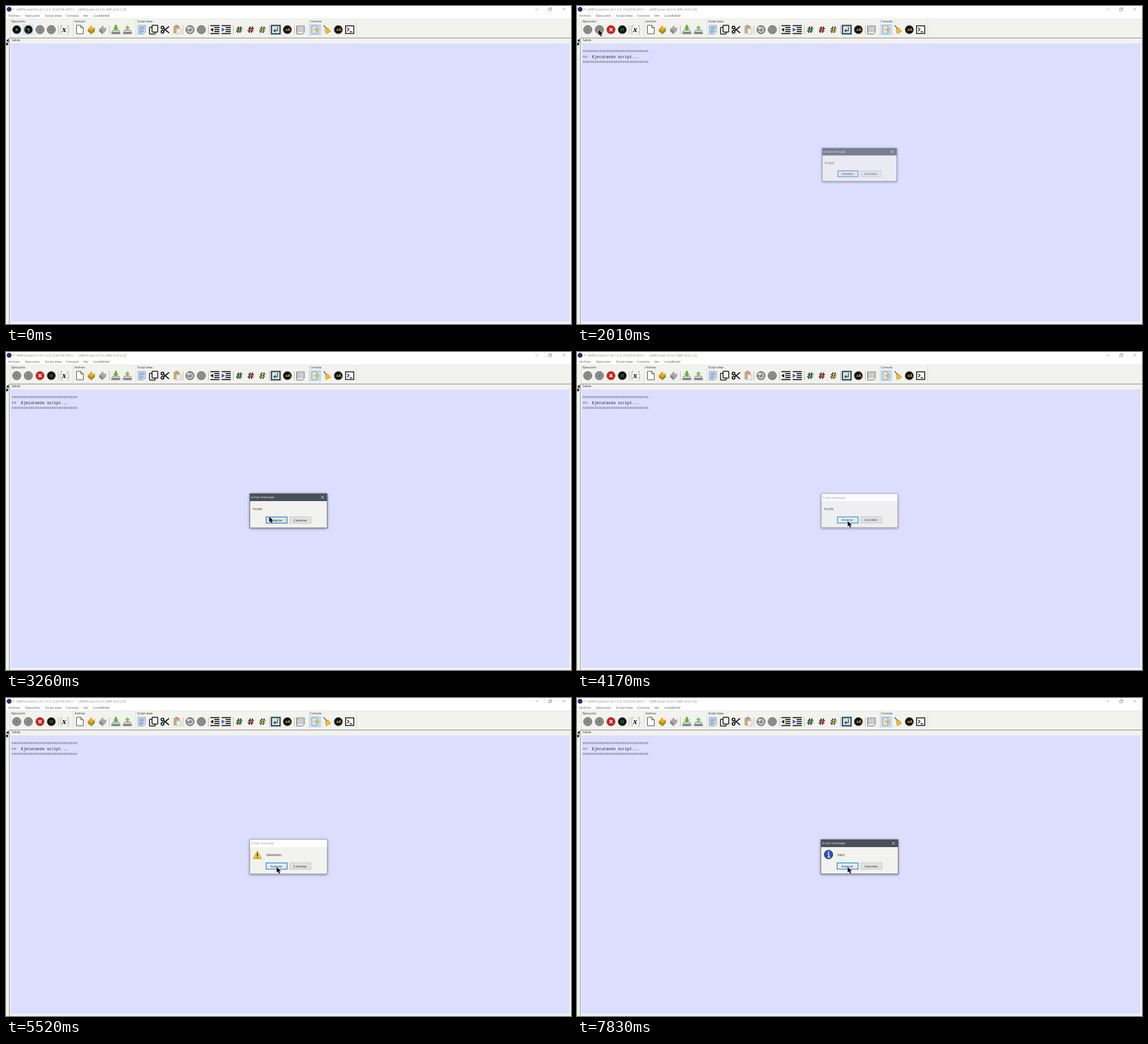
These frames come from a looping animation (998 px wide and 561 px high, 8000 ms). An HTML page:

```html
<!DOCTYPE html>
<html lang="es">
<head>
<meta charset="utf-8">
<title>Script mensaje</title>
<style>
  html, body { margin: 0; width: 100%; height: 100%; overflow: hidden; background: #fff; }
  svg { display: block; }
  text { font: 5.9px "Open Sans", "Noto Sans", sans-serif; white-space: pre; }
  .label text { font-size: 5.4px; }
  .console text { font: 6.92px "Liberation Mono", monospace; }
  #dialog { filter: drop-shadow(0 1px 2px #0007); }
</style>
</head>
<body>
<svg width="998" height="561" viewBox="0 0 998 561">
  <defs>
    <circle id="disc" r="7.4" stroke="#666" stroke-width=".9"/>
    <path id="play" d="M-1.6-2.6L2.6 0L-1.6 2.6Z"/>
    <path id="cross" d="M-2.6-2.6L2.6 2.6M2.6-2.6L-2.6 2.6" fill="none"/>
    <path id="pause" d="M-1.6-2.6V2.6M1.6-2.6V2.6" fill="none" stroke-width="1.3"/>
    <path id="hash" d="M-1-5.5L-3 5.5M3-5.5L1 5.5M-4.5-2H5.5M-5.5 2H4.5" fill="none" stroke="#222" stroke-width="2"/>
    <g id="box">
      <path d="M-6-1L1-8L2-3L7-4L6 2L0 8L-6 3Z"/>
      <path d="M-6-1L0 2V8L-6 3Z" fill="#0003"/>
    </g>
    <g id="tray">
      <path d="M-5 1H5L7.5 5V8H-7.5V5Z" fill="#ccc" stroke="#777" stroke-width=".8"/>
      <path d="M-6.5 6.2H6.5" stroke="#444" stroke-width="1.4"/>
    </g>
    <g id="font">
      <use href="#disc" fill="#111"/>
      <text x="-3.6" y="2.6" fill="#e0b030" style="font-size:7px;font-weight:700">ᴀA</text>
    </g>
    <g id="indent" fill="none" stroke="#111" stroke-width="1.7">
      <path d="M-8-7H8M-8 7H8M-1-3.5H8M-1 0H8M-1 3.5H8"/>
    </g>
  </defs>

  <!-- Window frame -->
  <rect width="998" height="561" fill="#f2f2ee"/>
  <rect width="998" height="22.5" fill="#fff"/>
  <circle cx="5.5" cy="5.7" r="4.3" fill="#35246f"/>
  <g fill="#8a887c">
    <text x="12" y="8">* &lt;JMEScriptGUI v0.1.2.0  (C)2018-2021&gt;</text>
    <text x="128" y="8">[JMEScript v0.2.0, JME v0.6.2.0]</text>
  </g>
  <path d="M935 5.7h5M958.5 4.5h4v4h-4zM960 4.5V3h4v4h-1.5M982.5 3l5 5M987.5 3l-5 5" fill="none" stroke="#888" stroke-width=".7"/>
  <g fill="#555">
    <text x="4" y="19">Archivo</text><text x="34" y="19">Ejecución</text>
    <text x="69" y="19">Script área</text><text x="106" y="19">Consola</text>
    <text x="136.5" y="19">Ver</text><text x="154" y="19">Look&amp;Feel</text>
  </g>
  <path d="M0 22.8H998" stroke="#ddd" stroke-width=".6"/>
  <path d="M7.5 24V54M118.5 24V54M229.5 24V54M535.5 24V54M619.5 24V54" stroke="#dcdcd8"/>
  <path d="M92.5 34V50M182.5 34V50M312.5 34V50M357.5 34V50M401.5 34V50M465.5 34V50M509.5 34V50" stroke="#aaa" stroke-width=".8"/>
  <path d="M6 561V56.5H998" fill="none" stroke="#858585"/>
  <path d="M.7 61L4.5 57.8V64.2ZM4.5 67L.7 63.8V70.2Z"/>
  <rect x="8.5" y="66" width="986.5" height="491" fill="#dcddff"/>
  <g class="label" fill="#222">
    <text x="10" y="29">Ejecución</text><text x="121" y="29">Archivo</text>
    <text x="232" y="29">Script área</text><text x="537" y="29">Consola</text>
    <text x="10" y="62.3">Salida</text>
  </g>

  <!-- Execution buttons -->
  <g id="idle">
    <rect x="29" y="32" width="20" height="19" fill="#d5e7f5"/>
    <g fill="#111">
      <use href="#disc" x="19" y="41.7"/><use href="#disc" x="39.5" y="41.7"/>
    </g>
    <g fill="#35c435">
      <use href="#play" x="19" y="41.7"/><use href="#play" x="40" y="41.7"/>
    </g>
    <g fill="#8c8c8c" stroke="#777">
      <use href="#disc" x="60" y="41.7"/><use href="#disc" x="80" y="41.7"/>
      <use href="#cross" x="60" y="41.7"/><use href="#pause" x="80" y="41.7"/>
    </g>
  </g>
  <g id="running">
    <g fill="#8c8c8c">
      <use href="#disc" x="19" y="41.7"/><use href="#disc" x="39.5" y="41.7"/>
    </g>
    <g fill="#777">
      <use href="#play" x="19" y="41.7"/><use href="#play" x="40" y="41.7"/>
    </g>
    <use href="#disc" x="60" y="41.7" fill="#e01818"/>
    <use href="#cross" x="60" y="41.7" stroke="#fff" stroke-width="1.8"/>
    <use href="#disc" x="80" y="41.7" fill="#111"/>
    <use href="#pause" x="80" y="41.7" stroke="#2a9a3a"/>
    <g class="console" fill="#222">
      <text x="10" y="82.3">============================</text>
      <text x="10" y="92">==  Ejecutando script...</text>
      <text x="10" y="101.4">============================</text>
    </g>
  </g>
  <path d="M99 34.5H97V40L95.5 42L97 44V49.5H99M108 34.5H110V40L111.5 42L110 44V49.5H108" fill="none" stroke="#777" stroke-dasharray="1.5 1"/>
  <text x="99.3" y="45.5" style="font:italic 700 14px 'Liberation Serif',serif">x</text>

  <!-- File buttons -->
  <path d="M124.5 34H132L136.5 38.5V49H124.5ZM132 34V38.5H136.5" fill="#fff" stroke="#444"/>
  <use href="#box" x="150.5" y="41.7" fill="#f3a51d"/>
  <path d="M151 50L157 44V40L151 45Z" fill="#58a832"/>
  <use href="#box" x="170.5" y="41.7" fill="#a8a8a8"/>
  <use href="#tray" x="194" y="41.2"/><use href="#tray" x="214.5" y="41.2"/>
  <path d="M192 33.5H196V38H199L194 43.5L189 38H192Z" fill="#5cb52c"/>
  <path d="M212.5 43V39H210L214.5 34L219 39H216.5V43Z" fill="#8cbd5c"/>

  <!-- Script area buttons -->
  <path d="M233.5 34H246.5V46L243 49.5H233.5Z" fill="#cfdcf0" stroke="#9ab"/>
  <path d="M235.5 37H244.5M235.5 39.5H244.5M235.5 42H242M235.5 44.5H244M235.5 47H241" stroke="#5c82bd"/>
  <g fill="#f2f2ee" stroke="#111" stroke-width="1.5">
    <rect x="253.5" y="37.5" width="10" height="12" rx="1"/>
    <rect x="258" y="34" width="10" height="12" rx="1"/>
  </g>
  <g fill="none" stroke="#111" stroke-width="1.8">
    <path d="M279 40L288 47.5M279 43.5L288 36"/>
    <circle cx="276.5" cy="38" r="2.4"/><circle cx="276.5" cy="45.5" r="2.4"/>
  </g>
  <rect x="296" y="35" width="11" height="13.5" rx="1" fill="#cda878"/>
  <rect x="299" y="33.5" width="5" height="3" fill="#999"/>
  <path d="M301 40H309V49H301Z" fill="#eee" stroke="#aaa" stroke-width=".7"/>
  <g fill="#8c8c8c"><use href="#disc" x="325" y="41.7"/><use href="#disc" x="345" y="41.7"/></g>
  <path d="M321.5 39.5A4.3 4.3 0 1 1 321 43.5M321 36.5V40H324.5" fill="none" stroke="#eee" stroke-width="1.4"/>
  <use href="#indent" x="369" y="41.7"/><use href="#indent" x="389" y="41.7"/>
  <path d="M361 41.7L366 38.5V45Z"/>
  <path d="M387 41.7L381 38V45.4Z" fill="#2c6cc4"/>
  <use href="#hash" x="412" y="41.7"/><use href="#hash" x="432.5" y="41.7"/><use href="#hash" x="453" y="41.7"/>
  <g stroke-width="1.6">
    <path d="M408 43.7H416M409 39.7H417" stroke="#35b035"/>
    <path d="M428.5 43.7H436.5M429.5 39.7H437.5" stroke="#e03545"/>
    <path d="M449 43.7H457M450 39.7H458" stroke="#d9c92e"/>
  </g>
  <rect x="466.5" y="32" width="20" height="19.5" fill="#bcd9ee"/>
  <rect x="469" y="34.5" width="15" height="14.5" fill="#d5e5dc" stroke="#222" stroke-width="1.7"/>
  <path d="M479.5 37V43.5H473.5M476 41L473 43.5L476 46" fill="none" stroke="#346" stroke-width="1.3"/>
  <use href="#font" x="497" y="41.7"/>
  <path d="M513.5 35H527V46L524 49.5H513.5Z" fill="#eee" stroke="#666"/>
  <path d="M514 37.5H526.5M514 40H526.5M514 42.5H526.5M514 45H526.5" stroke="#777" stroke-width="1.1" stroke-dasharray="1.8 .7"/>

  <!-- Console buttons -->
  <rect x="536.5" y="32" width="20" height="19.5" fill="#b9dcf5"/>
  <path d="M540.5 35H549V48.5H540.5Z" fill="#e8e6da" stroke="#888" stroke-width=".8"/>
  <path d="M545 40.5H549V38L553 41.8L549 45.5V43H545Z" fill="#edc36a" stroke="#a98b45" stroke-width=".6"/>
  <path d="M561 34L567 41" stroke="#9a5a20" stroke-width="1.8"/>
  <path d="M564 41.5L568.5 38.5L573.5 45L565.5 49Z" fill="#efbd2c" stroke="#a87916" stroke-width=".6"/>
  <use href="#font" x="587" y="41.7"/>
  <rect x="599.8" y="35" width="14.5" height="13.5" fill="#fff" stroke="#111" stroke-width="1.5"/>
  <path d="M602.5 38.5L606 41.5L602.5 44.5M607 45.5H611.5" fill="none" stroke="#111" stroke-width="1.3"/>

  <!-- Message dialog -->
  <g id="dialog">
    <rect id="frame" x="430.8" y="249.8" width="136.4" height="60.4" fill="#f2f2ee" stroke-width=".8"/>
    <rect id="bar" x="431" y="250" width="136" height="13"/>
    <text id="caption" x="432.6" y="258.3">Script mensaje:</text>
    <use id="close" href="#cross" x="559" y="256.3" stroke="#eee" stroke-width=".9"/>
    <g id="WARNING">
      <path d="M444 270L451.3 283.5H436.7Z" fill="#f5cd25" stroke="#b48d20" stroke-linejoin="round"/>
      <path d="M444 274V279M444 280.5V282" stroke="#222" stroke-width="1.7"/>
    </g>
    <g id="ERROR">
      <circle cx="444.3" cy="276.2" r="7.6" fill="#c91f28" stroke="#8e1a20"/>
      <use href="#cross" x="444.3" y="276.2" stroke="#fff" stroke-width="2.2" stroke-linecap="round"/>
    </g>
    <g id="INFO">
      <circle cx="444.3" cy="276.2" r="7.6" fill="#2b50bd" stroke="#1b2f7d"/>
      <path d="M442.5 275H444.8V280.5M442.5 280.7H447" fill="none" stroke="#fff" stroke-width="1.6"/>
      <circle cx="444.3" cy="271.8" r="1.2" fill="#fff"/>
    </g>
    <text id="message" y="279" fill="#222"></text>
    <rect id="accept" x="459.5" y="291" width="37" height="11" stroke="#2585cf" stroke-width="1.3"/>
    <rect x="501.2" y="290.8" width="37.5" height="11.4" fill="#e1e1e1" stroke="#b5b5b5" stroke-width=".7"/>
    <text x="467" y="298.7" fill="#222">Aceptar</text>
    <text x="507.7" y="298.7" fill="#222">Cancelar</text>
  </g>
  <path id="cursor" d="M0 0V10.2L2.3 8.1L4 12L6.2 11L4.6 7.4H8Z" stroke="#fff" stroke-width=".4"/>
</svg>
<script>
  const LOOP = 8000, FADE = 200;
  const $ = id => document.getElementById(id);
  const set = (id, attrs) => Object.entries(attrs).forEach(([k, v]) => $(id).setAttribute(k, v));
  const show = (id, on) => { $(id).style.display = on ? '' : 'none'; };
  const progress = (t, start, length) => Math.min(1, Math.max(0, (t - start) / length));
  const easeOut = u => 1 - (1 - u) ** 3;

  const dialogs = [
    { kind: 'PLAIN', open: 1950, blur: 4110, shut: 4120 },
    { kind: 'WARNING', open: 4370, blur: 5460, shut: 5520 },
    { kind: 'ERROR', open: 5760, blur: 6920, shut: 6980 },
    { kind: 'INFO', open: 7220, blur: LOOP, shut: LOOP },
  ];

  function drawDialog(t) {
    const d = dialogs.find(d => t >= d.open && t < d.shut + FADE);
    show('dialog', d);
    if (!d) return;
    const visible = easeOut(progress(t, d.open, FADE)) * (1 - progress(t, d.shut, FADE) ** 1.5);
    const active = t < d.blur;
    set('dialog', {
      opacity: visible,
      transform: `translate(499 280) scale(${0.9 + 0.1 * visible}) translate(-499 -280)`,
    });
    set('frame', { stroke: active ? '#555c63' : '#999' });
    set('bar', { fill: active ? '#485059' : '#fff' });
    set('caption', { fill: active ? '#eee' : '#999' });
    show('close', active);
    ['WARNING', 'ERROR', 'INFO'].forEach(kind => show(kind, kind === d.kind));
    set('message', { x: d.kind === 'PLAIN' ? 436 : 460 });
    $('message').textContent = d.kind;
    set('accept', { fill: t >= 3560 ? '#e3eef8' : '#e1e1e1' });
  }

  function drawCursor(t) {
    const settle = easeOut(progress(t, 150, 800));
    const travel = easeOut(progress(t, 2710, 800));
    const x = 34 + 4 * settle + 440 * travel;
    const y = 38 + 4 * settle + 256 * travel;
    set('cursor', { transform: `translate(${x} ${y})` });
  }

  function draw(now) {
    const t = now % LOOP;
    show('idle', t < 1860);
    show('running', t >= 1860);
    drawDialog(t);
    drawCursor(t);
    requestAnimationFrame(draw);
  }
  draw(performance.now());
</script>
</body>
</html>
```
